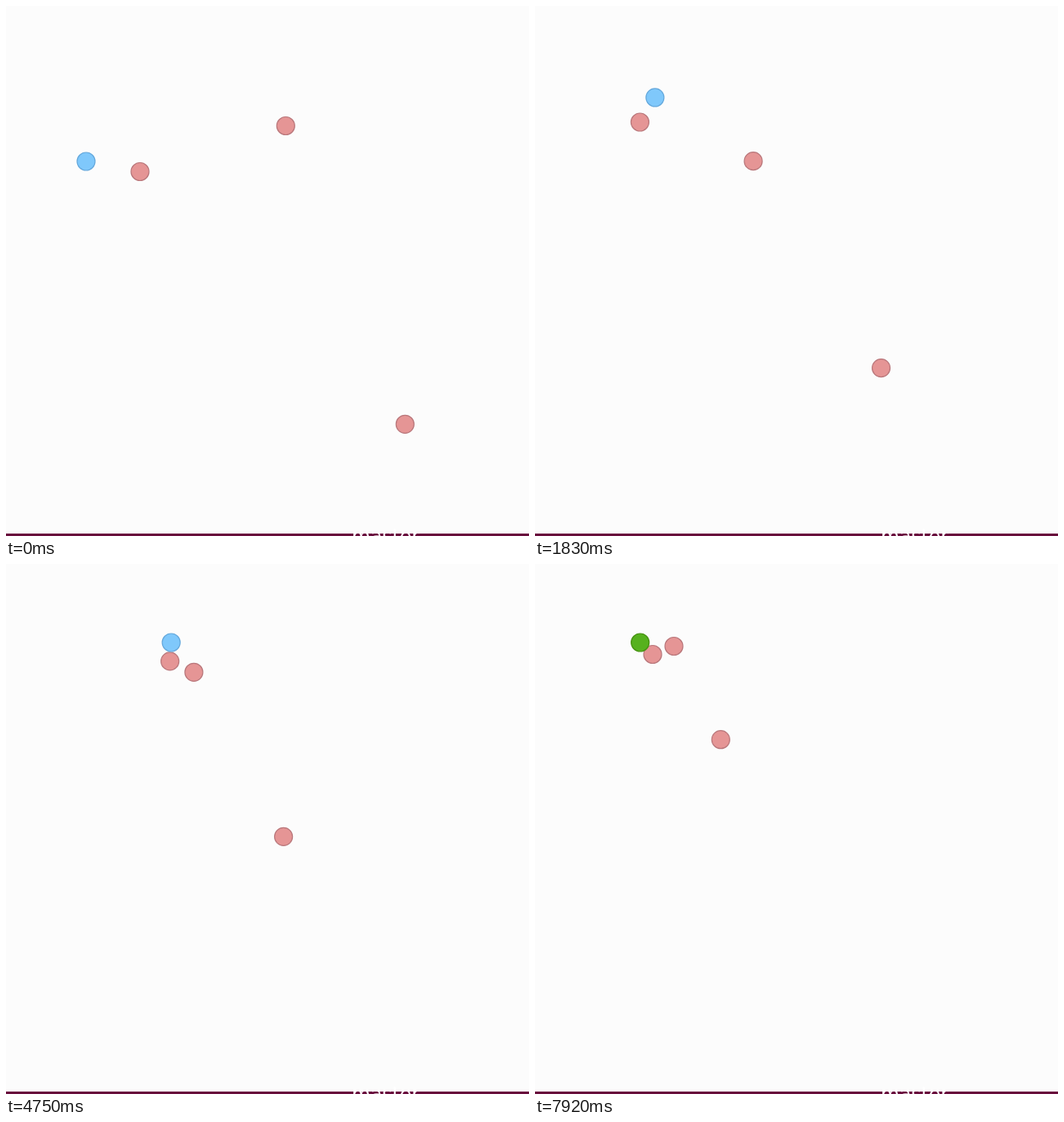
Write an HTML page with a canvas that moves like this. It is 640 px wide and 648 px high and loops after 8 s.

```html
<!DOCTYPE html>
<html>
<head>
<meta charset="utf-8">
<style>
html, body { margin: 0; width: 100%; height: 100%; overflow: hidden; background: #fcfcfc; }
canvas { display: block; }
</style>
</head>
<body>
<canvas id="stage" width="640" height="648"></canvas>
<script>
const ctx = document.getElementById('stage').getContext('2d');
const LOOP = 8000, FPS = 12, RADIUS = 11, CONTACT = 22, WALL = 96;

// A straight run from a to b, bent by a sum of sine waves
const glide = (a, b, ...bends) => u =>
  bends.reduce((sum, k, i) => sum + k * Math.sin((i + 1) * Math.PI * u), a + (b - a) * u);

const prey = {
  x: glide(98, 128.7, 82.6, -11.1, -3.2, -1.3, -1.6),
  y: u => Math.max(WALL, 190 - 337 * u)
};
const pack = [
  { x: glide(164, 144, 24.3, -37.7, -11.1, -3.3, -0.4), y: glide(202.5, 110.5, -39, -12, -1.2, 1, 1.2) },
  { x: glide(342.3, 170, -25.5, -26.5, 7.7, 4.4, -1.4), y: glide(146.5, 100.5, 39.2, 31.9, -1, -6, 3.7) },
  { x: glide(488.3, 227.3, 4, -7), y: glide(511.3, 214.7) }
];

const at = (agent, u) => ({ x: agent.x(u), y: agent.y(u) });

function disc({ x, y }, fill, edge) {
  ctx.beginPath();
  ctx.arc(x, y, RADIUS, 0, Math.PI * 2);
  ctx.fillStyle = fill;
  ctx.fill();
  ctx.strokeStyle = edge;
  ctx.lineWidth = 1.2;
  ctx.stroke();
}

function footer() {
  ctx.fillStyle = '#680a3c';
  ctx.fillRect(0, 645, 640, 3);
  ctx.fillStyle = '#fff';
  ctx.font = '23.5px "DejaVu Sans", sans-serif';
  ctx.fillText('master', 423, 656);
}

function draw(t) {
  const step = Math.floor((t + 4) * FPS / 1000);
  const u = Math.min(1, step / (LOOP * FPS / 1000 - 1));
  const target = at(prey, u);
  const hunters = pack.map(agent => at(agent, u));
  const caught = hunters.some(h => Math.hypot(h.x - target.x, h.y - target.y) < CONTACT);

  ctx.fillStyle = '#fcfcfc';
  ctx.fillRect(0, 0, 640, 648);
  footer();
  for (const h of hunters) disc(h, '#e59595', '#b9777b');
  if (caught) disc(target, '#56b11e', '#459010');
  else disc(target, '#7fc8fb', '#64a8dc');
}

function tick() {
  draw(performance.now() % LOOP);
  requestAnimationFrame(tick);
}
tick();
</script>
</body>
</html>
```
